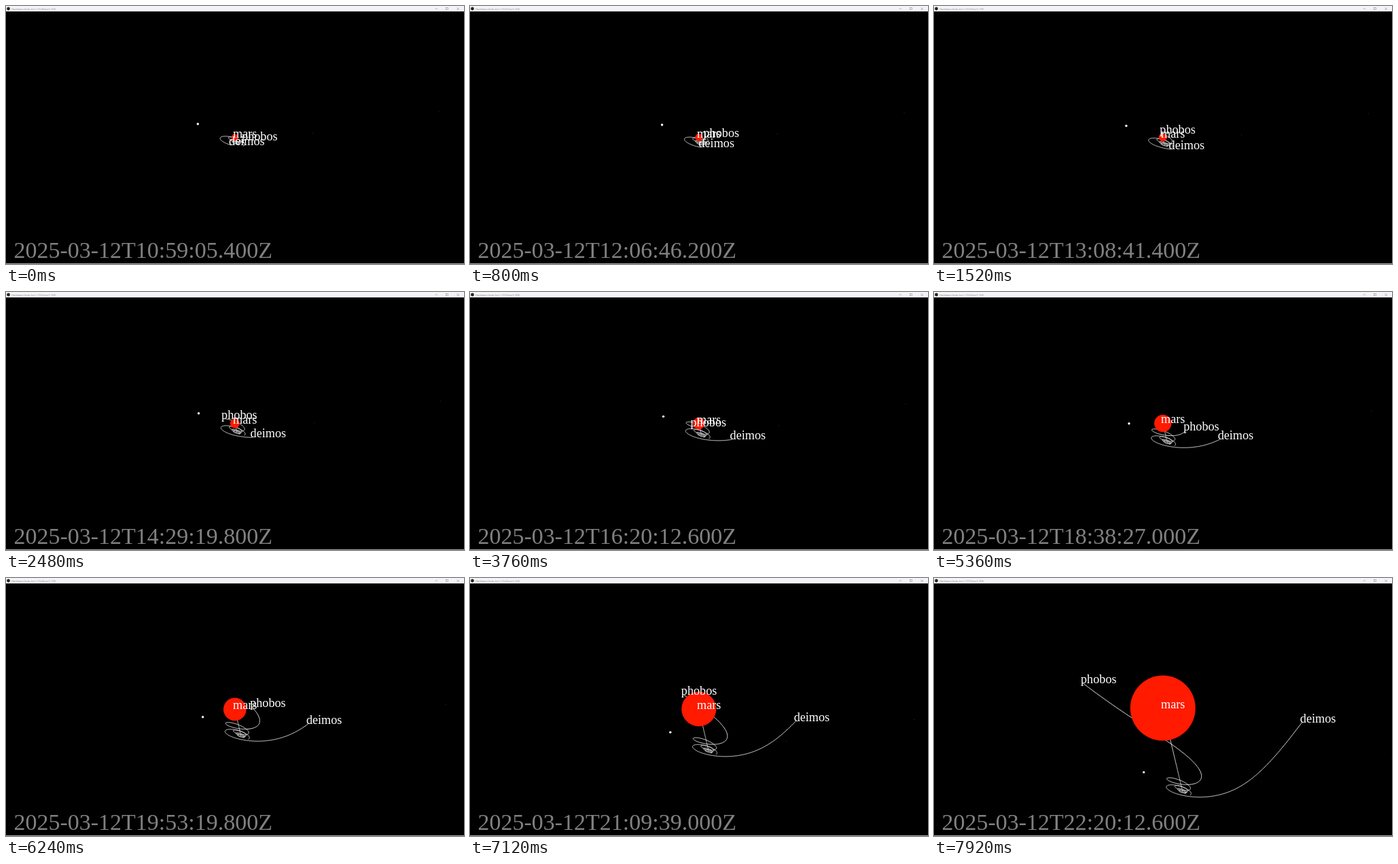
Recreate the animation shown at these times as an HTML page with a canvas. Size 674 px wide and 380 px high, loop 8 s.

```html
<!DOCTYPE html>
<html lang="en">
<head>
<meta charset="utf-8">
<title>Mars approach</title>
<style>
html, body { margin: 0; width: 100%; height: 100%; overflow: hidden; background: #000; }
canvas { display: block; width: 674px; height: 380px; }
</style>
</head>
<body>
<canvas id="stage"></canvas>
<script>
const W = 674, H = 380, LOOP = 8000, FRAME = 80;
const FOCAL = 615;            // lens, px
const HOURS_PER_STEP = 0.024; // one step is a thousandth of a day
const START = Date.UTC(2025, 2, 12, 10, 59, 5, 400);
const TRAIL_START = -24;      // hours
const RAD = Math.PI / 180;
const SERIF = '"Liberation Serif", "Times New Roman", serif';

const canvas = document.getElementById('stage');
const dpr = window.devicePixelRatio || 1;
canvas.width = W * dpr;
canvas.height = H * dpr;
const ctx = canvas.getContext('2d');
ctx.scale(dpr, dpr);

// Clock: [frame, steps elapsed]
const clock = [[0, 0], [19, 90], [31, 146], [47, 223], [67, 319], [78, 371], [99, 473]];

function stepsAt(frame) {
  const i = Math.max(1, clock.findIndex(k => k[0] >= frame));
  const [f0, n0] = clock[i - 1], [f1, n1] = clock[i];
  return Math.round(n0 + (n1 - n0) * (frame - f0) / (f1 - f0));
}

// Positions seen from the spacecraft, in Mars radii: x right, y down, z ahead
const mars = h => [-0.605, -2.62, 12.53 + 9.71 * (11.352 - h)];

function moon(rate, phase, a, b) {
  return h => {
    const angle = (rate * h + phase) * RAD, c = Math.cos(angle), s = Math.sin(angle);
    return mars(h).map((v, i) => v + a[i] * c + b[i] * s);
  };
}
const phobos = moon(47.05, -5, [2.62, 0.72, 0.27], [0, -0.97, 2.59]);
const deimos = moon(11.89, -9.5, [0, 2.55, -6.42], [6.6, 1.52, 0.6]);
const bodies = { mars, phobos, deimos };

// Camera that keeps Mars in the middle of the view
function cameraAt(h) {
  const [mx, my, mz] = mars(h);
  const yaw = Math.atan2(mx, mz), pitch = Math.atan2(my, Math.hypot(mx, mz));
  const cy = Math.cos(yaw), sy = Math.sin(yaw), cp = Math.cos(pitch), sp = Math.sin(pitch);
  const radius = FOCAL / Math.hypot(mx, my, mz);
  const midX = 336.8, midY = 193.6 - 2 * (radius / 48) ** 2;
  const project = ([x, y, z]) => {
    const x1 = x * cy - z * sy, z1 = x * sy + z * cy;
    const y1 = y * cp - z1 * sp, depth = y * sp + z1 * cp;
    return [midX + FOCAL * x1 / depth, midY + FOCAL * y1 / depth];
  };
  return { project, radius };
}

function disc(x, y, r, color) {
  ctx.fillStyle = color;
  ctx.beginPath();
  ctx.arc(x, y, r, 0, 2 * Math.PI);
  ctx.fill();
}

function write(text, x, y, size, color, family = SERIF) {
  ctx.font = `${size}px ${family}`;
  ctx.fillStyle = color;
  ctx.fillText(text, x, y);
}

function trail(body, h, project) {
  ctx.beginPath();
  for (let s = TRAIL_START; s < h; s += 0.05) ctx.lineTo(...project(body(s)));
  ctx.lineTo(...project(body(h)));
  ctx.stroke();
}

function titleBar(frame) {
  ctx.fillStyle = '#f3f3f9';
  ctx.fillRect(0, 0, W, 8);
  ctx.fillStyle = '#aaa';
  ctx.fillRect(0, 379, W, 1);
  disc(3.5, 4, 2.4, '#1c2a1c');
  const noise = Math.abs(Math.sin(frame * 12.9898) * 43758.5453) % 1;
  const ms = (10.4 + noise * 0.3).toFixed(2), load = (1.6 + noise * 0.4).toFixed(1);
  write(`Hardware locks for (~${ms}ms/${load}%)`, 8, 5.5, 3.9, '#8a8a8e', '"Open Sans", sans-serif');
  ctx.strokeStyle = '#777';
  ctx.lineWidth = 0.5;
  ctx.strokeRect(647.5, 2.5, 3, 3);
  ctx.beginPath();
  ctx.moveTo(631.5, 4); ctx.lineTo(635, 4);
  ctx.moveTo(663.5, 2.5); ctx.lineTo(667, 6);
  ctx.moveTo(667, 2.5); ctx.lineTo(663.5, 6);
  ctx.stroke();
}

function draw(frame) {
  const steps = stepsAt(frame), h = steps * HOURS_PER_STEP;
  const { project, radius } = cameraAt(h);
  ctx.fillStyle = '#000';
  ctx.fillRect(0, 0, W, H);

  // Background lights, infinitely far away
  disc(...project([298.5, -51, FOCAL]), 0.5, '#444');
  disc(...project([112, -19.5, FOCAL]), 0.5, '#444');
  disc(...project([-57.6, -33, FOCAL]), 1.7, '#fff');

  ctx.strokeStyle = '#fff';
  ctx.lineWidth = 0.85;
  for (const name in bodies) trail(bodies[name], h, project);
  disc(...project(mars(h)), radius, '#ff1a00');
  for (const name in bodies) {
    const [x, y] = project(bodies[name](h));
    write(name, x - 2.8, y, 18.2, '#fff');
  }

  write(new Date(START + steps * 86400).toISOString(), 11.4, 371, 34, '#808080');
  titleBar(frame);
}

function tick() {
  draw(Math.floor(performance.now() % LOOP / FRAME));
  requestAnimationFrame(tick);
}
tick();
</script>
</body>
</html>
```
